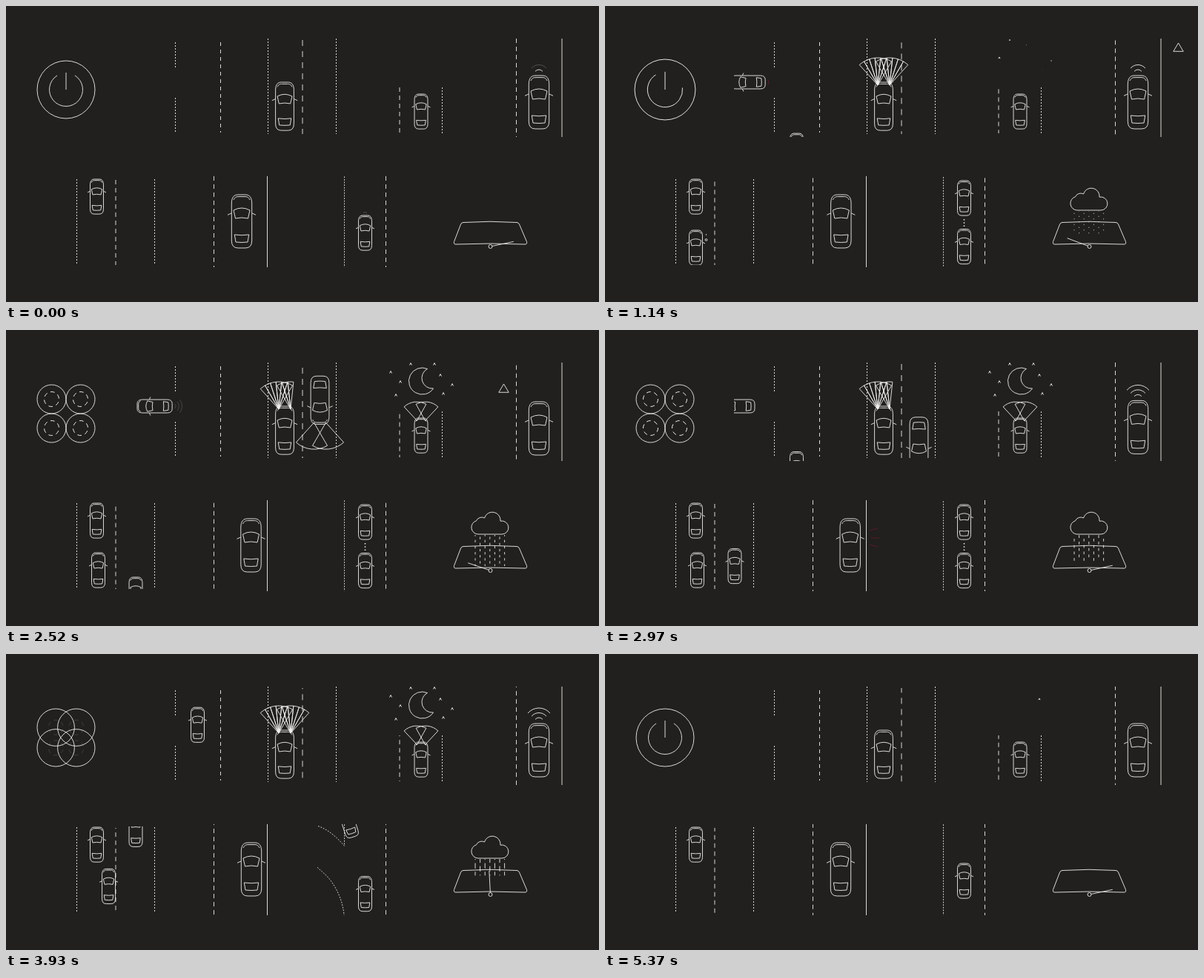
Animation of 800 by 400 pixels, one loop 5.4 s. Source, as an HTML page:

```html
<!DOCTYPE html>
<html lang="en">
<head>
<meta charset="utf-8">
<title>Driver assistance icons</title>
<style>
  html, body { margin: 0; width: 100%; height: 100%; overflow: hidden; background: #21201e; }
  svg { display: block; width: 800px; height: 400px; fill: none; stroke: #f3f2ef; stroke-width: .88; }
  .red { stroke: #b3123a; }
</style>
</head>
<body>
<svg viewBox="0 0 800 400">
  <defs>
    <clipPath id="crossing"><rect x="174" y="44" width="130" height="133"/></clipPath>
    <clipPath id="oncoming"><rect x="340" y="44" width="120" height="129"/></clipPath>
    <clipPath id="lanes"><rect x="90" y="233" width="120" height="117"/></clipPath>
    <clipPath id="exit"><rect x="420" y="230" width="100" height="123"/></clipPath>
  </defs>
  <g id="stage"></g>
</svg>
<script>
const LOOP = 5400, STEP = 30;
const stage = document.getElementById('stage');

const clamp = v => Math.max(0, Math.min(1, v));
const ramp = (t, from, to) => clamp((t - from) / (to - from));
const linear = v => v;
const smooth = v => v * v * (3 - 2 * v);
const backOut = v => 1 + 2.3 * (v - 1) ** 3 + 1.3 * (v - 1) ** 2;
const shown = (t, from, to, fade = 150) => Math.min(ramp(t, from, from + fade), ramp(t, to, to - fade));

// Value at time t between [time, value] stops
function key(t, stops, ease = smooth) {
  if (t <= stops[0][0]) return stops[0][1];
  for (let i = 1; i < stops.length; i++) {
    const [a, from] = stops[i - 1], [b, to] = stops[i];
    if (t < b) return from + (to - from) * ease((t - a) / (b - a));
  }
  return stops[stops.length - 1][1];
}

const path = (d, attrs = '') => `<path d="${d}" ${attrs}/>`;
const circle = (x, y, r, attrs = '') => `<circle cx="${x}" cy="${y}" r="${r}" ${attrs}/>`;
const group = (content, attrs) => `<g ${attrs}>${content}</g>`;
const fade = (opacity, content, cls = '') =>
  opacity > 0 ? group(content, `opacity="${opacity}" class="${cls}"`) : '';
const clip = (id, content) => group(content, `clip-path="url(#${id})"`);
const line = (x, top, bottom, dash = 'none', offset = 0) =>
  path(`M${x} ${top}V${bottom}`, `stroke-dasharray="${dash}" stroke-dashoffset="${offset}"`);
const dotted = (x, top, bottom) => line(x, top, bottom, '2 2');
const rolling = (t, x, top, bottom, dash = 6, gap = 5) =>
  line(x, top, bottom, `${dash} ${gap}`, -(dash + gap) * 20 * t / LOOP);
const trimmed = (d, amount) =>
  amount > 0 ? path(d, `pathLength="1" stroke-dasharray="${amount} 2"`) : '';

const polar = (x, y, r, deg) => {
  const a = deg * Math.PI / 180;
  return `${x + r * Math.sin(a)} ${y - r * Math.cos(a)}`;
};
const arc = (x, y, r, from, to) =>
  `M${polar(x, y, r, from)}A${r} ${r} 0 ${to - from > 180 ? 1 : 0} 1 ${polar(x, y, r, to)}`;
const wedge = (x, y, r, from, to) => `M${x} ${y}L${arc(x, y, r, from, to).slice(1)}Z`;

const CAR = 'M-13.7 12C-13.7 3-10 0-5 0H5C10 0 13.7 3 13.7 12V62Q13.7 72 5 72H-5Q-13.7 72-13.7 62Z' +
  'M-11 7C-9 3-7 2.6-4 2.6H4C7 2.6 9 3 11 7' +
  'M-11 21Q0 15 11 21L8.5 32Q0 30-8.5 32Z' +
  'M-9.7 54Q0 55.5 9.7 54L8 64Q0 65-8 64Z' +
  'M-14 25L-19 27.3M14 25L19 27.3';
const SMALL = 0.655, MEDIUM = 0.905;
const car = (x, y, scale = 1, turn = 0) =>
  path(CAR, `vector-effect="non-scaling-stroke" transform="translate(${x} ${y}) rotate(${turn}) scale(${scale})"`);

// Three sparks beside a car
const rays = (x, y, s) =>
  path(`M${x} ${y - 10 * s}l${11 * s} ${-3 * s}M${x + 2 * s} ${y}h${11 * s}M${x} ${y + 9 * s}l${11 * s} ${3 * s}`);

function waveLevels(t) {
  const u = t % 540, off = 1 - ramp(u, 320, 460);
  return [off, ramp(u, -10, 30) * off, ramp(u, 75, 150) * off];
}
const waves = (x, y, spacing, levels) =>
  levels.map((v, i) => fade(v, path(arc(x, y, spacing * (i + 1), -50, 50)))).join('');

function power(t) {
  const x = 81, y = 113;
  const scale = key(t, [[600, 1], [1000, 1.08], [1140, 1.05], [1320, 1]]);
  const split = t < 3000 ? backOut(ramp(t, 1340, 1720)) : 1 - backOut(ramp(t, 3900, 4300));
  const drawn = t < 3000 ? 1 - smooth(ramp(t, 1060, 1360)) : smooth(ramp(t, 4560, 5130));
  const r = 39 - 19.5 * split, d = 19.5 * split;
  const rings = shown(t, 1600, 3960, 200);
  let out = '';
  for (const [sx, sy] of [[-1, -1], [1, -1], [-1, 1], [1, 1]]) {
    const cx = x + sx * d, cy = y + sy * d;
    out += circle(cx, cy, r);
    out += fade(rings, circle(cx, cy, 10,
      `pathLength="60" stroke-dasharray="5.5 4.5" transform="rotate(${t * 0.08} ${cx} ${cy})"`));
    if (Math.abs(split) < 1e-6) break;
  }
  if (drawn > 0) {
    const stem = t < 3000 ? 1 - ramp(t, 1180, 1360) : drawn;
    out += path(arc(x, y, 22.5, 328 - 296 * drawn, 328)) + path(`M${x} ${y - 23 * stem}V${y}`);
  }
  return group(out, `transform="translate(${x} ${y}) scale(${scale}) translate(${-x} ${-y})"`);
}

function crossing(t) {
  const rear = key(t, [[650, 170], [1140, 216], [1450, 224], [2750, 224], [3250, 170]]);
  const passing = t < 2700
    ? key(t, [[1100, 178], [1920, 57], [2350, -8]], linear)
    : key(t, [[2830, 178], [4410, 26], [4760, -8]], linear);
  let out = car(258.5, passing, SMALL) + car(rear - 47, 103, SMALL, -90);
  for (let i = 0; i < 3; i++) {
    const level = shown(t, 1080 + 160 * i, 2420, 120);
    const d = path(arc(rear, 103, 5 + 4.3 * i, 50, 130));
    out += fade(level, d, 'red') + fade(0.2 * shown(t, 2360, 2640, 100), d);
  }
  return dotted(228.5, 49, 83) + dotted(228.5, 124, 171) + line(289.5, 49, 171, '5 5') + clip('crossing', out);
}

function adaptiveBeam(t) {
  let out = car(376, 103, MEDIUM);
  for (const side of [-1, 1]) {
    for (let i = 0; i < 6; i++) {
      const from = (side < 0 ? -42 : -30) + 12 * i;
      let level = shown(t, 350 + 90 * i, 4750 + 70 * i, 120);
      if (side > 0 && i > 2) level *= 1 - shown(t, 1560 + 50 * (5 - i), 3000 + 80 * i, 120);
      out += fade(level, path(wedge(376 + side * 8, 107, 37, from, from + 12)));
    }
  }
  if (t > 1500 && t < 3500) {
    const lamps = 51 + (t - 1920) * 0.1235;
    out += car(423.5, lamps + 2.3, MEDIUM, 180);
    out += path(wedge(415.5, lamps, 36, 150, 222) + wedge(431.5, lamps, 36, 138, 210));
  }
  return dotted(353.5, 44, 173) + rolling(t, 400, 46, 173, 8, 7) + dotted(445.5, 44, 173) + clip('oncoming', out);
}

const STARS = [[532, 70], [546, 46], [602, 74], [590, 86], [519, 57], [526, 88], [578, 46], [586, 61]];

function night(t) {
  let out = rolling(t, 531, 110, 172) + dotted(588.5, 110, 172) + car(560, 119, SMALL);
  STARS.forEach(([x, y], i) => {
    const s = 1.5 * shown(t, 1000 + 45 * i, 4430 + 155 * i, 200);
    if (s > 0) out += path(`M${x - s} ${y + s}L${x} ${y - s}L${x + s} ${y + s}`);
  });
  const moon = t < 3000 ? smooth(ramp(t, 1100, 2100)) : 1 - smooth(ramp(t, 4500, 5150));
  out += trimmed('M568.5 52.5A18 18 0 1 0 576.5 79A14.1 14.1 0 0 1 568.5 52.5', moon);
  const beam = t < 3000 ? ramp(t, 1550, 2200) : 1 - ramp(t, 4550, 5100);
  if (beam > 0) {
    for (const side of [-1, 1]) {
      const x = 560 + side * 5.5, y = 122.5, r = 25.5;
      const a = side < 0 ? -43 : -29, b = a + 72, half = 36 * beam;
      const reach = r * Math.min(1, beam * 2);
      out += path(`M${x} ${y}L${polar(x, y, reach, a)}M${x} ${y}L${polar(x, y, reach, b)}`);
      if (beam > 0.4) out += path(arc(x, y, r, a, a + half) + arc(x, y, r, b - half, b));
    }
  }
  return out;
}

function hazard(t) {
  const top = key(t, [[1650, 94], [1900, 97], [2600, 97], [3300, 94]]);
  const x = key(t, [[930, 780], [1140, 773.5], [1740, 747], [1920, 719.5], [2520, 671.5], [2760, 655]], linear);
  const y = 56 + (773.5 - x) * 0.225;
  const clear = 1 - shown(t, 1550, 2950, 100);
  return rolling(t, 688.5, 44, 177) + line(750, 44, 177) + car(719, top) +
    waves(719, top - 1.5, 6.5, waveLevels(t).map(v => v * clear)) +
    fade(0.6 * shown(t, 1600, 2200), path(arc(719, top - 1.5, 19.5, -50, 50)), 'red') +
    fade(shown(t, 930, 2760), path(`M${x} ${y - 6}l6.7 11.3h-13.4Z`));
}

function laneChange(t) {
  const x = key(t, [[1150, 122.5], [2300, 124.5], [3700, 124.5], [4350, 173.5]]);
  const y = key(t, [[550, 352], [1140, 303], [1350, 301], [3700, 301], [4400, 259], [4500, 252], [5150, 180]]);
  const overtaking = 334 - (t - 2520) * 0.0856;
  let out = car(122.5, 234, SMALL) + car(x, y, SMALL);
  if (t > 2200 && t < 4400) out += car(175, overtaking, SMALL);
  out += fade(shown(t, 900, 2300), circle(136.5, y + 13, 1.4) + circle(136.5, y + 6, 0.4));
  out += fade(0.8 * shown(t, 3200, 3700, 120), rays(139.5, 319, 0.58), 'red');
  return dotted(95.5, 234, 350) + rolling(t, 148, 235, 350) + dotted(200.5, 234, 350) + clip('lanes', out);
}

function laneKeep(t) {
  const x = key(t, [[1050, 318], [1920, 329.5], [2500, 330.5], [3500, 331], [4150, 331], [4410, 328], [5000, 318]]);
  return rolling(t, 280.5, 230, 353) + line(352.5, 230, 353) + car(x, 255) +
    fade(0.9 * shown(t, 2900, 3750), rays(357, 281, 1), 'red');
}

function cruise(t) {
  const y = key(t, [[350, 283], [1050, 301.5], [3850, 301.5], [4410, 285], [4700, 283]]);
  const lead = key(t, [[350, 180], [1050, 236], [3550, 236], [4300, 170]]);
  const leave = smooth(ramp(t, 3550, 4300));
  const scroll = (t - 3420) * 0.13;
  const edge = 'M456.5 900V295C456.5 268 444 244 430 231L420 222' +
    'M456.5-700V193C447 182 434 170 420 166';
  const clear = 1 - shown(t, 250, 4250, 100);
  const out = path(edge, `transform="translate(0 ${scroll})" stroke-dasharray="1.8 1.8"`) +
    car(484.5, y, SMALL) + car(484.5 - 60 * leave, lead, SMALL, -35 * leave) +
    fade(shown(t, 950, 3650), path('M484.5 288v10', 'stroke-width="1.5" stroke-dasharray="1.5 2.7"')) +
    waves(484.5, y - 1, 3.2, waveLevels(t).slice(1).map(v => v * clear));
  return rolling(t, 512.5, 230, 353) + clip('exit', out);
}

function rain(t) {
  const right = 78, left = -73;
  const angle = key(t, [[550, right], [1200, left], [1550, right], [1900, left], [2220, right], [2540, left],
    [2980, right], [3500, right], [4320, left], [4760, right]]);
  let out = path('M617 292.5Q653 290 689 292.5Q691.5 292.5 692.5 295L702.5 318.5Q703.5 322.5 699 322Q653 320 608 322Q603.5 322.5 604.5 318.5L613.5 295Q614.5 292.5 617 292.5Z');
  out += circle(653.5, 325, 2.5) + path(`M${polar(653.5, 325, 2.5, angle)}L${polar(653.5, 325, 32, angle)}`);
  const cloud = t < 3000 ? smooth(ramp(t, 600, 1080)) : 1 - smooth(ramp(t, 4600, 5150));
  out += trimmed('M637 276A9.3 9.3 0 0 1 634.5 257.8A8 8 0 0 1 645.5 254A11 11 0 0 1 667 258.2A9 9 0 1 1 669 276Z', cloud);
  const drop = key(t, [[1950, 1], [2520, 3.2], [3420, 4.2], [4410, 10]], linear);
  const gap = key(t, [[1950, 6.5], [2520, 5], [3420, 5], [4410, 4]]);
  const bottom = key(t, [[800, 277], [1140, 309], [1920, 313], [2520, 319], [3420, 305], [4410, 294], [4700, 277]], linear);
  let drops = '';
  for (let i = 0; i < 7; i++) {
    drops += line(633 + 6.6 * i, 277, bottom, `${drop} ${gap}`, -(i % 2 ? 4 : 0) - t * 0.0222);
  }
  return out + fade(shown(t, 850, 4700), drops);
}

const scenes = [power, crossing, adaptiveBeam, night, hazard, laneChange, laneKeep, cruise, rain];
const start = performance.now();

function frame() {
  const elapsed = (performance.now() - start) % LOOP;
  const t = Math.floor(elapsed / STEP) * STEP;
  stage.innerHTML = scenes.map(scene => scene(t)).join('');
  requestAnimationFrame(frame);
}
frame();
</script>
</body>
</html>
```
